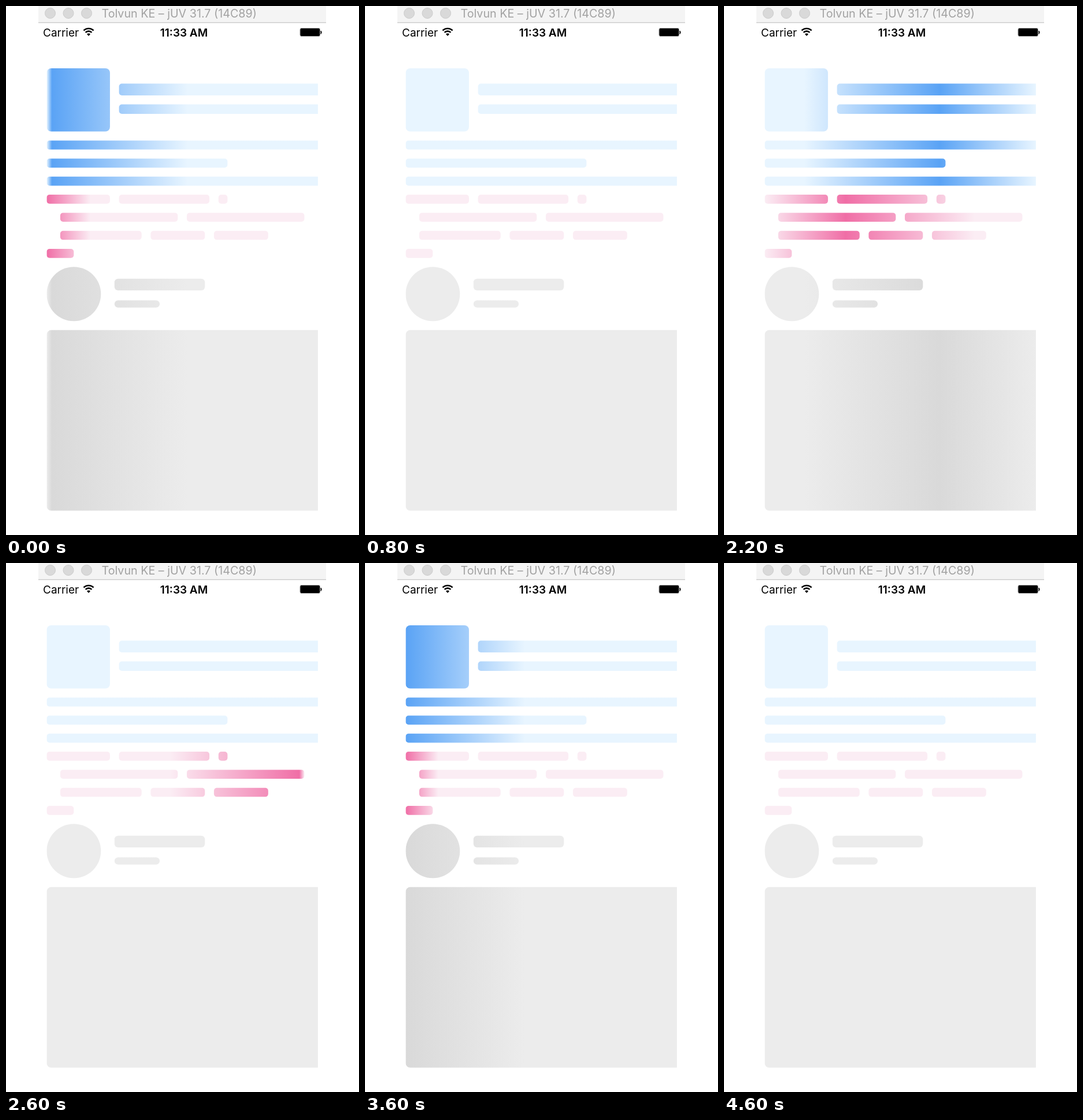
An HTML page that plays this animation: 611 by 917 pixels, repeating every 4800 ms.

```html
<!DOCTYPE html>
<html lang="en">
<head>
<meta charset="utf-8">
<title>Skeleton loading</title>
<style>
  html, body { margin: 0; width: 100%; height: 100%; overflow: hidden; background: #fff; }
  svg { display: block; width: 611px; height: 917px; }
  text { font: 19px Inter, Roboto, sans-serif; }
  .title { font-size: 19.7px; fill: #a2a2a2; }
  .clock { font-weight: 600; }
</style>
</head>
<body>
<svg viewBox="0 0 611 917">
  <defs id="defs">
    <clipPath id="column"><rect width="30" height="50"/></clipPath>
  </defs>

  <!-- window bar -->
  <rect x="56" width="498" height="28" fill="#f4f4f4"/>
  <rect x="56" y="28" width="498" height="1.5" fill="#cdcdcd"/>
  <g id="buttons" fill="#d9d9d9" stroke="#cbcbcb"></g>
  <text class="title" x="165.5" y="20">Tolvun KE – jUV 31.7 (14C89)</text>

  <!-- status bar -->
  <text x="64" y="53">Carrier</text>
  <path d="M134.5 42.5a12 12 0 0 1 17 0M137.6 45.9a7.6 7.6 0 0 1 10.8 0" fill="none" stroke="#000" stroke-width="2.6"/>
  <path d="M143 52l-3-3.2a4.2 4.2 0 0 1 6 0z"/>
  <text class="clock" x="308" y="53" text-anchor="middle">11:33 AM</text>
  <rect x="509" y="38.5" width="34.5" height="14" rx="2.5" stroke="#999"/>
  <path d="M545 43q2.5 2.5 0 5.5z" stroke="#000"/>

  <!-- one unit is the height of a text line -->
  <g id="cards" transform="translate(70.4 108) scale(15.65)" clip-path="url(#column)"></g>
</svg>
<script>
const LOOP = 4800, STEP = 200;
const SPEED = 1.665 / 1000; // gradient widths per ms
const HALF = 0.5;           // half of the highlight's width
const WIDE = 31;            // runs past the right edge of the column

// width: gradient span; lead: how far the first sweep has run, in ms
const themes = {
  blue: { width: 30, base: '#e8f5ff', peak: '#5aa3f5', lead: 312, period: 1824 },
  pink: { width: 28.5, base: '#fbedf4', peak: '#f06ea6', lead: 102, period: 1813 },
  gray: { width: 30, base: '#ececec', peak: '#d9d9d9', lead: 312, period: 1824 }
};

const byId = id => document.getElementById(id);

function add(parent, tag, attrs) {
  const node = document.createElementNS('http://www.w3.org/2000/svg', tag);
  for (const key in attrs) node.setAttribute(key, attrs[key]);
  return parent.appendChild(node);
}

function block(theme, x, y, width, height = 1, rx = 0.32) {
  add(byId('cards'), 'rect', { x, y, width, height, rx, fill: `url(#${theme})` });
}

// Blocks side by side, one unit apart
function line(theme, y, x, ...widths) {
  for (const width of widths) {
    block(theme, x, y, width);
    x += width + 1;
  }
}

for (const name in themes) {
  const theme = themes[name];
  const gradient = add(byId('defs'), 'linearGradient', {
    id: name, gradientUnits: 'userSpaceOnUse', x1: 0, x2: theme.width, y1: 0, y2: 0
  });
  theme.stops = [theme.base, theme.peak, theme.base].map(color =>
    add(gradient, 'stop', { 'stop-color': color }));
}

for (let i = 0; i < 3; i++) add(byId('buttons'), 'circle', { cx: 76.5 + 31.5 * i, cy: 12.5, r: 9 });

// article
block('blue', 0, 0, 7, 7, 0.5);
block('blue', 8, 1.7, WIDE, 1.3);
block('blue', 8, 4, WIDE, 1.05);
[WIDE, 20, WIDE].forEach((width, i) => line('blue', 8 + 2 * i, 0, width));

// code: indent, then word widths
[[0, 7, 10, 1], [1.5, 13, 13], [1.5, 9, 6, 6], [0, 3]]
  .forEach((words, i) => line('pink', 14 + 2 * i, ...words));

// post
block('gray', 0, 22, 6, 6, 3);
block('gray', 7.5, 23.3, 10, 1.3, 0.4);
block('gray', 7.5, 25.7, 5, 0.8, 0.4);
block('gray', 0, 29, WIDE, 20, 0.5);

const clamp = v => Math.min(1, Math.max(0, v));

function draw(time) {
  for (const { stops, base, peak, lead, period } of Object.values(themes)) {
    const front = (time + lead) % period * SPEED;
    const sweeping = front < 1 + HALF; // rests once the peak reaches the right edge
    stops.forEach((stop, i) => stop.setAttribute('offset', clamp(front - (2 - i) * HALF)));
    stops[1].setAttribute('stop-color', sweeping ? peak : base);
  }
}

const origin = performance.now();
function tick() {
  const time = (performance.now() - origin) % LOOP;
  draw(Math.floor(time / STEP) * STEP);
  requestAnimationFrame(tick);
}
tick();
</script>
</body>
</html>
```
